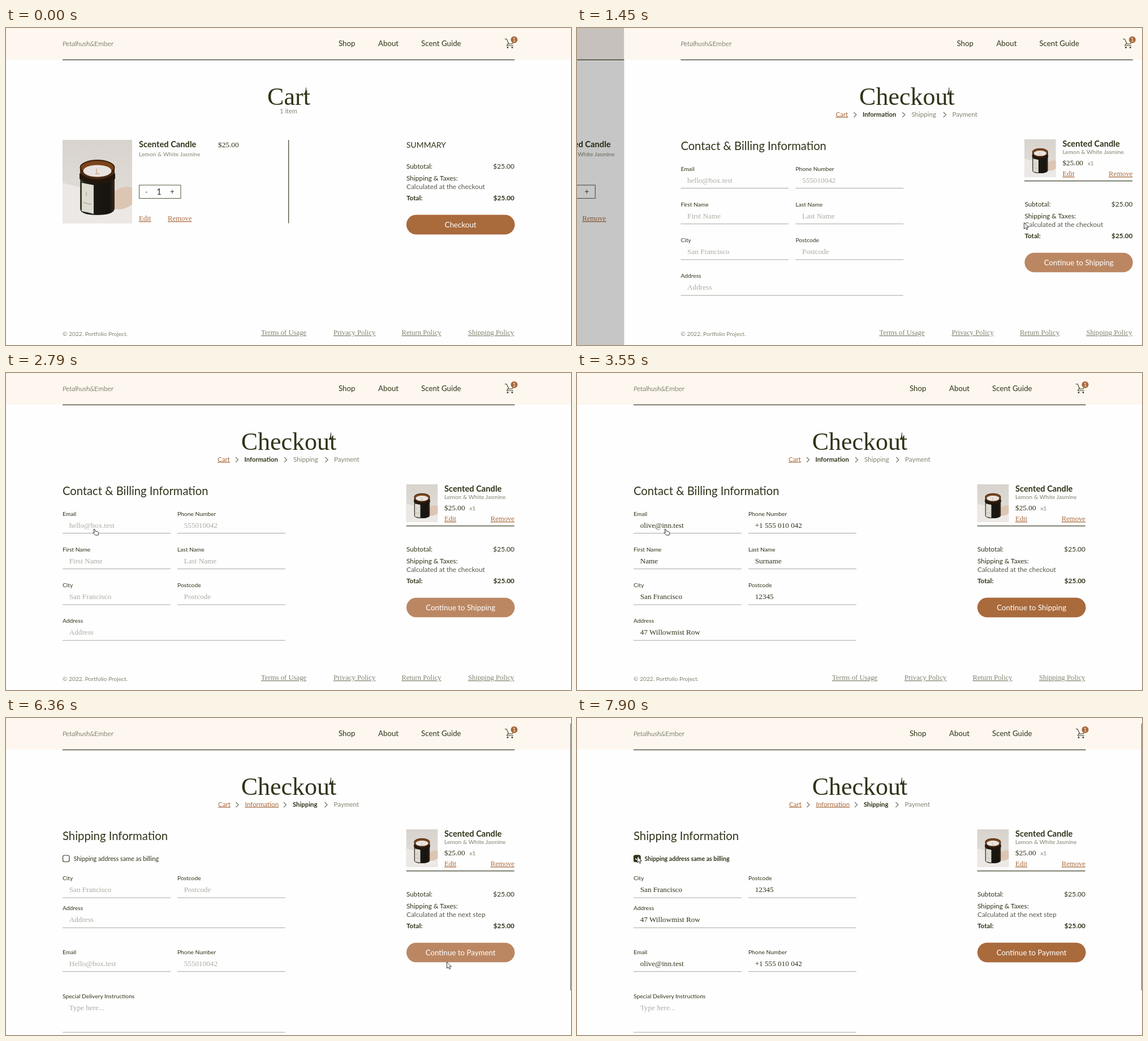
Animation of 999x561 px, one loop 8000 ms. Source, as an HTML page:

```html
<!DOCTYPE html>
<html lang="en">
<head>
<meta charset="utf-8">
<title>Candle shop checkout</title>
<style>
  html, body { margin: 0; width: 100%; height: 100%; overflow: hidden; background: #fefefe; }
  svg { display: block; width: 999px; height: 561px; }
  text { font-family: Lato, "Open Sans", sans-serif; fill: #2f3419; white-space: pre; }
  .serif { font-family: "Liberation Serif", "Noto Serif", serif; }
  .bold { font-weight: 700; }
  .light { font-weight: 300; }
  .grey { fill: #81846f; }
  .soft { fill: #55584a; }
  .hint { fill: #abada3; }
  .accent { fill: #a96a3c; }
  .white { fill: #fff; }
  .link { text-decoration: underline; text-underline-offset: 2px; }
  .mid { text-anchor: middle; }
  .end { text-anchor: end; }
</style>
</head>
<body>
<svg viewBox="0 0 999 561">
  <defs>
    <linearGradient id="wall" x2="0" y2="1">
      <stop offset="0" stop-color="#d8d3cd"/><stop offset="1" stop-color="#e3dfdb"/>
    </linearGradient>
    <linearGradient id="glass">
      <stop offset="0" stop-color="#3c402c"/><stop offset=".2" stop-color="#1c1c14"/>
      <stop offset=".85" stop-color="#17130f"/><stop offset="1" stop-color="#38291c"/>
    </linearGradient>
    <g id="photo">
      <path fill="url(#wall)" d="M0 0H123V147.500H0Z"/>
      <path fill="#ece8e6" d="M0 76L123 108V147.500H0Z"/>
      <path fill="#dcc5b3" d="M90 92Q112 78 123 85V114Q108 126 90 122Z"/>
      <path fill="url(#glass)" d="M31 68Q61 84 92 68V122Q90 133 61 133T31 122Z"/>
      <path fill="#4a2a12" d="M31 48V70Q61 86 92 70V48Z"/>
      <path fill="#22170e" d="M30 59Q61 81 93 59V69Q61 88 30 69Z"/>
      <ellipse cx="61.500" cy="49" rx="30" ry="13" fill="#7b431a" stroke="#33200f" stroke-width="2"/>
      <ellipse cx="61.500" cy="55" rx="25" ry="10.500" fill="#e9e3df"/>
      <path d="M60 51V59M58 60H65" stroke="#b98a63" fill="none"/>
      <path fill="#dedbd3" d="M34 76L55 80V131L34 126Z"/>
      <path d="M37 111L51 114M42 92V100" stroke="#96938a" fill="none"/>
    </g>
  </defs>
  <g id="cartPage"></g>
  <rect id="shade" width="999" height="561"/>
  <g id="infoPage"></g>
  <g id="shipPage"></g>
  <g id="cursor" stroke="#33363a" stroke-linejoin="round" fill="#fff">
    <path id="arrow" d="M0 0V11L2.600 8.700 4.400 12.500 6.300 11.600 4.600 7.900H8Z"/>
    <path id="hand" d="M0 .8Q1.100-.4 2 .8L3 4 7.500 5Q9 5.500 8.700 7.500L8 11H3.200L-.8 7.200Q-1.200 5.700.2 6L1.300 6.600Z"/>
  </g>
</svg>
<script>
const $ = id => document.getElementById(id);
const DARK = '#3a3e25', ACCENT = '#a96a3c', PALE = '#bb8763';

const text = (x, y, size, content, classes = '') =>
  `<text x="${x}" y="${y}" font-size="${size}" class="${classes}">${content}</text>`;
const line = (x1, y, x2, color = '#a6a79f', width = 1) =>
  `<path d="M${x1} ${y}H${x2}" stroke="${color}" stroke-width="${width}"/>`;
const layer = (id, content) => `<g id="${id}">${content}</g>`;

const header = () => `
  <rect width="999" height="561" fill="#fefefe"/>
  <rect width="999" height="56" fill="#fdf7f0"/>
  ${line(100, 56.3, 899.5, DARK, 1.2)}
  ${text(100, 32, 12.2, '<tspan font-style="italic">Petalhush&amp;</tspan>Ember', 'light')}
  ${text(588, 32, 13.3, 'Shop')}${text(658, 32, 13.3, 'About')}${text(734, 32, 13.3, 'Scent Guide')}
  <path d="M882 19.500H885L889 28H895L898 23M888 27L885.500 31H897" fill="none" stroke="${DARK}" stroke-width="1.100"/>
  <g fill="${DARK}"><circle cx="887" cy="34.500" r="1.400"/><circle cx="895" cy="34.500" r="1.400"/></g>
  <circle cx="898.500" cy="20.700" r="6" fill="${ACCENT}"/>
  ${text(898.5, 24, 9, '1', 'white mid')}`;

const title = (word, spike) => text(500, 135.500, 44, word, 'serif mid') +
  `<path fill="#2f3419" d="M${spike - 4} 118Q${spike} 114 ${spike} 105.500H${spike + 1}V118Z"/>`;

const footer = () => text(100, 545, 10.2, '© 2022. Portfolio Project.', 'grey') +
  [[451, 'Terms of Usage'], [579, 'Privacy Policy'], [699.5, 'Return Policy'], [817, 'Shipping Policy']]
    .map(([x, label]) => text(x, 543, 12.7, label, 'serif grey link')).join('');

const totals = (y, taxes) =>
  text(708, y, 11.8, 'Subtotal:') + text(899, y, 12, '$25.00', 'end') +
  text(708, y + 20.5, 11.9, 'Shipping &amp; Taxes:') +
  text(708, y + 35.5, 11.9, taxes, 'soft') +
  text(708, y + 56, 11.7, 'Total:', 'bold') + text(899, y + 56, 11.9, '$25.00', 'bold end');

const button = (id, y, label) => {
  const pill = color => `<rect x="708" y="${y}" width="191.500" height="34.500" rx="17.250" fill="${color}"/>`;
  return pill(PALE) + layer(id, pill(ACCENT)) + text(803.7, y + 22.3, 13.3, label, 'white mid');
};

const product = () => `
  <use href="#photo" transform="translate(707.700 197) scale(.452)"/>
  ${text(775, 210, 14.7, 'Scented Candle', 'bold')}
  ${text(775, 222.5, 10.25, 'Lemon &amp; White Jasmine', 'grey')}
  ${text(775, 243, 13.3, '$25.00', 'serif')}${text(819.5, 243, 10, 'x1', 'grey')}
  ${text(775, 262, 12.7, 'Edit', 'serif accent link')}${text(899, 262, 12.7, 'Remove', 'serif accent link end')}
  ${line(707.7, 270.7, 898.7, DARK, 1.3)}`;

// Crumbs before the current step are links, later ones are grey.
const crumbs = (current, starts, chevrons) =>
  ['Cart', 'Information', 'Shipping', 'Payment'].map((label, i) =>
    text(starts[i], 156.5, i === current ? 11.3 : 11.6, label,
      i < current ? 'accent link' : i === current ? 'bold' : 'grey')).join('') +
  chevrons.map(x => `<path d="M${x - 2.5} 149L${x + 2} 153.500L${x - 2.5} 158" fill="none" stroke="#777a6c" stroke-width="1.300"/>`).join('');

const LEFT = 100, RIGHT = 303;
const fieldFrame = ([x, y, label, , , wide, drop = 31]) =>
  text(x, y, 10.25, label) + line(x, y + drop, wide ? 493.5 : x + 191);
const fieldValue = ([x, y, , value], classes) => text(x + 11.7, y + 21, 13.2, value, 'serif ' + classes);
const form = (name, fields) =>
  fields.map(fieldFrame).join('') +
  layer(name + 'Hints', fields.map(f => fieldValue(f, 'hint')).join('')) +
  layer(name + 'Filled', fields.filter(f => f[4])
    .map(([x, y, label, , value]) => fieldValue([x, y, label, value], '')).join(''));

const city = 'San Francisco', zip = '12345', street = '47 Willowmist Row';
const mail = 'olive@inn.test', phone = '+1 555 010 042', phoneHint = '555010042';

$('cartPage').innerHTML = header() + title('Cart', 530) +
  text(499.5, 151, 11, '1 item', 'grey mid') +
  '<use href="#photo" x="100" y="198"/>' +
  text(235, 211, 14.7, 'Scented Candle', 'bold') +
  text(235, 227, 10.25, 'Lemon &amp; White Jasmine', 'grey') +
  text(375, 210.5, 13.3, '$25.00', 'serif') +
  `<rect x="235.500" y="278" width="73.500" height="23.500" fill="none" stroke="#55583f"/>` +
  text(248.3, 293.5, 12, '-', 'mid') + text(270.5, 295, 15, '1', 'mid') + text(294, 293.5, 13, '+', 'mid') +
  text(235, 341, 12.8, 'Edit', 'serif accent link') + text(286, 341, 12.7, 'Remove', 'serif accent link') +
  `<path d="M499.700 198V345.500" stroke="${DARK}" stroke-width="1.200"/>` +
  text(708, 211.7, 13.9, 'SUMMARY') + totals(249, 'Calculated at the checkout') +
  button('cartActive', 330.7, 'Checkout') + footer();

$('infoPage').innerHTML = header() + title('Checkout', 574) +
  crumbs(1, [374, 421.5, 508, 580], [408.5, 494.5, 567]) +
  text(100, 216, 20.2, 'Contact &amp; Billing Information') +
  form('info', [
    [LEFT, 252.5, 'Email', 'hello@box.test', mail],
    [RIGHT, 252.5, 'Phone Number', phoneHint, phone],
    [LEFT, 315.7, 'First Name', 'First Name', 'Name'],
    [RIGHT, 315.7, 'Last Name', 'Last Name', 'Surname'],
    [LEFT, 379, 'City', city, city],
    [RIGHT, 379, 'Postcode', 'Postcode', zip],
    [LEFT, 442.2, 'Address', 'Address', street, true]]) +
  product() + totals(316, 'Calculated at the checkout') +
  button('infoActive', 397.7, 'Continue to Shipping') + footer();

$('shipPage').innerHTML = header() + title('Checkout', 574) +
  crumbs(2, [375, 422.5, 507, 579.5], [409, 493.5, 566]) +
  text(100, 216, 20.3, 'Shipping Information') +
  `<rect x="100.500" y="243" width="11.500" height="11.500" rx="3" fill="#fff" stroke="${DARK}" stroke-width="1.200"/>` +
  layer('unchecked', text(119.5, 253, 10.8, 'Shipping address same as billing')) +
  layer('checked', `<rect x="100" y="242.500" width="12.500" height="12.500" rx="3" fill="#2f3419"/>
    <path d="M103 248.500L105.500 251L109.500 246" fill="none" stroke="#fff" stroke-width="1.300"/>` +
    text(119.5, 253, 10.6, 'Shipping address same as billing', 'bold')) +
  form('ship', [
    [LEFT, 287, 'City', city, city],
    [RIGHT, 287, 'Postcode', 'Postcode', zip],
    [LEFT, 340.2, 'Address', 'Address', street, true],
    [LEFT, 417.7, 'Email', 'Hello@box.test', mail],
    [RIGHT, 417.7, 'Phone Number', phoneHint, phone],
    [LEFT, 495.7, 'Special Delivery Instructions', 'Type here...', '', true, 60.5]]) +
  // The last hint stays visible after the form is filled.
  text(111.7, 516.7, 13.2, 'Type here...', 'serif hint') +
  product() + totals(316, 'Calculated at the next step') +
  button('shipActive', 397.7, 'Continue to Payment') +
  '<path d="M998.400 10V482" stroke="#777" stroke-width="1.200"/>';
$('shipHints').lastElementChild.remove();

const progress = (t, from, to) => Math.min(1, Math.max(0, (t - from) / (to - from)));
const easeOut = (p, power = 2) => 1 - (1 - p) ** power;
const easeInOut = p => p * p * (3 - 2 * p);
const fade = (t, from, to) => easeOut(progress(t, from, to));
const opacity = (id, value) => $(id).setAttribute('opacity', value);

// Each move: start time, end time, then four Bézier points.
const moves = [
  [280, 760, [898, 521], [870, 470], [815, 375], [790.5, 344.5]],
  [2080, 2790, [790.5, 344.5], [600, 330], [300, 245], [155, 276]],
  [3940, 4730, [155, 276], [330, 290], [620, 420], [777.5, 432]],
  [5490, 5830, [777.5, 432], [778, 432], [779, 432], [779.5, 432]],
  [6360, 6970, [779.5, 432], [830, 400], [-70, 250], [106.5, 245]]];

function cursorAt(t) {
  const [from, to, ...points] = moves.filter(m => t >= m[0]).pop() || moves[0];
  const p = easeInOut(progress(t, from, to)), q = 1 - p;
  return [0, 1].map(i => q ** 3 * points[0][i] + 3 * q * q * p * points[1][i] +
    3 * q * p * p * points[2][i] + p ** 3 * points[3][i]);
}

function draw(t) {
  const slide = easeOut(progress(t, 1295, 1590), 3.3);
  $('cartPage').setAttribute('transform', `translate(${-302 * slide})`);
  $('infoPage').setAttribute('transform', `translate(${999 * (1 - slide)})`);
  opacity('shade', .24 * slide);
  opacity('cartActive', 1 - fade(t, 640, 760) + fade(t, 980, 1120));

  const filled = fade(t, 3240, 3550);
  opacity('infoHints', 1 - filled);
  opacity('infoFilled', filled);
  opacity('infoActive', filled - fade(t, 4600, 4730) + fade(t, 4815, 5210));

  opacity('shipPage', fade(t, 5490, 5830));
  const same = fade(t, 7380, 7850);
  for (const id of ['checked', 'shipFilled', 'shipActive']) opacity(id, same);
  for (const id of ['unchecked', 'shipHints']) opacity(id, 1 - same);

  const pointing = t >= 2700 && t < 3960;
  $('cursor').setAttribute('transform', `translate(${cursorAt(t)})`);
  opacity('cursor', t < 280 ? 0 : 1);
  opacity('arrow', pointing ? 0 : 1);
  opacity('hand', pointing ? 1 : 0);
}

const start = performance.now();
function tick() {
  draw((performance.now() - start) % 8000);
  requestAnimationFrame(tick);
}
tick();
</script>
</body>
</html>
```
